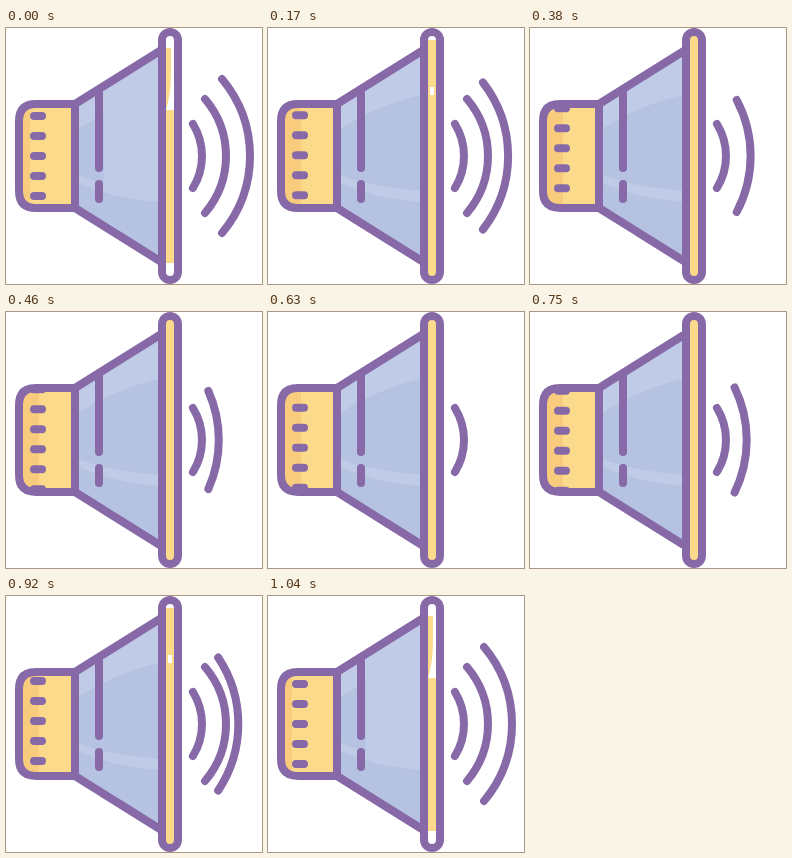
An HTML page for the animation above (1.18 s loop, 256 by 256 pixels).

```html
<!DOCTYPE html>
<html lang="en">
<head>
<meta charset="utf-8">
<title>Speaker</title>
<style>
  html, body { margin: 0; width: 100%; height: 100%; overflow: hidden; background: #fff; }
  svg { display: block; width: 100vw; height: 100vh; }
  .line { fill: none; stroke: #8769a8; stroke-width: 8; stroke-linecap: round; stroke-linejoin: round; }
</style>
</head>
<body>
<svg viewBox="0 0 256 256">
  <defs>
    <clipPath id="boxClip"><path d="M69 76H30Q13 76 13 93V163Q13 180 30 180H69Z"/></clipPath>
    <clipPath id="coneClip"><path d="M69 76L157 21V235L69 180Z"/></clipPath>
  </defs>

  <g clip-path="url(#boxClip)">
    <rect x="9" y="72" width="64" height="112" fill="#fbdb8b"/>
    <rect id="shade" x="13" y="76" width="20" height="104" fill="#f9cb7d"/>
    <path id="slots" class="line"/>
  </g>
  <path class="line" d="M69 76H30Q13 76 13 93V163Q13 180 30 180H69"/>

  <g clip-path="url(#coneClip)">
    <rect x="69" y="16" width="90" height="224" fill="#b5c2e1"/>
    <path d="M69 76L157 21V66Q110 76 69 103Z" fill="#bfcbe7"/>
    <path d="M69 146Q105 160 157 163V174Q105 171 69 153Z" fill="#c0cce7"/>
    <path id="gloss" d="M98 58L157 21V163Q125 162 98 155Z" fill="#bfcbe7"/>
  </g>
  <path class="line" d="M157 21L69 76V180L157 235M93 65V140M93 156V171"/>

  <rect x="156" y="4" width="16" height="248" rx="8" fill="#fbdb8b"/>
  <g fill="#fff">
    <path id="topLight" d="M159 7H169V12H159Z"/>
    <path id="spotLight" d="M162 59H166V67H162Z"/>
    <path id="wideLight" d="M159 7H169V82H160Q165 66 165 46V20H159ZM159 235H169V249H159Z"/>
  </g>
  <rect class="line" x="156" y="4" width="16" height="248" rx="8"/>

  <path id="inner" class="line"/>
  <path id="middle" class="line"/>
  <path id="outer" class="line"/>
</svg>
<script>
  const LOOP = 1180;
  const RATE = 0.024; // steps per millisecond
  const TURN = 14;    // step at which the motion reverses
  const REACH = 11;   // steps from rest to the turn

  const el = id => document.getElementById(id);
  const show = (id, on) => el(id).setAttribute('visibility', on ? 'visible' : 'hidden');

  function wave(id, apex, half, radius) {
    const x = apex - radius + Math.sqrt(radius * radius - half * half);
    el(id).setAttribute('d', `M${x} ${128 - half}A${radius} ${radius} 0 0 1 ${x} ${128 + half}`);
  }

  function draw(time) {
    const tick = Math.floor((time % LOOP) / 10) * 10;
    const step = Math.floor((tick + 4.9) * RATE);
    const p = Math.max(0, REACH - Math.abs(step - TURN));

    // The outer wave shrinks inward and swallows the one it meets.
    wave('outer', 244 - 3.9 * p, 77 - 3.5 * p, 120);
    show('outer', p < 10);
    show('middle', p < 4);

    const lift = p ? 6.25 * (1 - Math.cos(Math.PI * (p + 1) / 12)) : 0;
    let slots = '';
    for (let y = 88; y <= 188; y += 20) slots += `M28 ${y - lift}H36`;
    el('slots').setAttribute('d', slots);

    const resting = p === 0;
    el('shade').setAttribute('width', resting ? 11 : 20);
    show('gloss', resting);
    show('wideLight', resting);
    show('topLight', p < 5);
    show('spotLight', p > 0 && p < 5);
  }

  wave('inner', 196, 32, 61);
  wave('middle', 220, 57, 88);

  const start = performance.now();
  function loop() {
    draw(performance.now() - start);
    requestAnimationFrame(loop);
  }
  loop();
</script>
</body>
</html>
```
